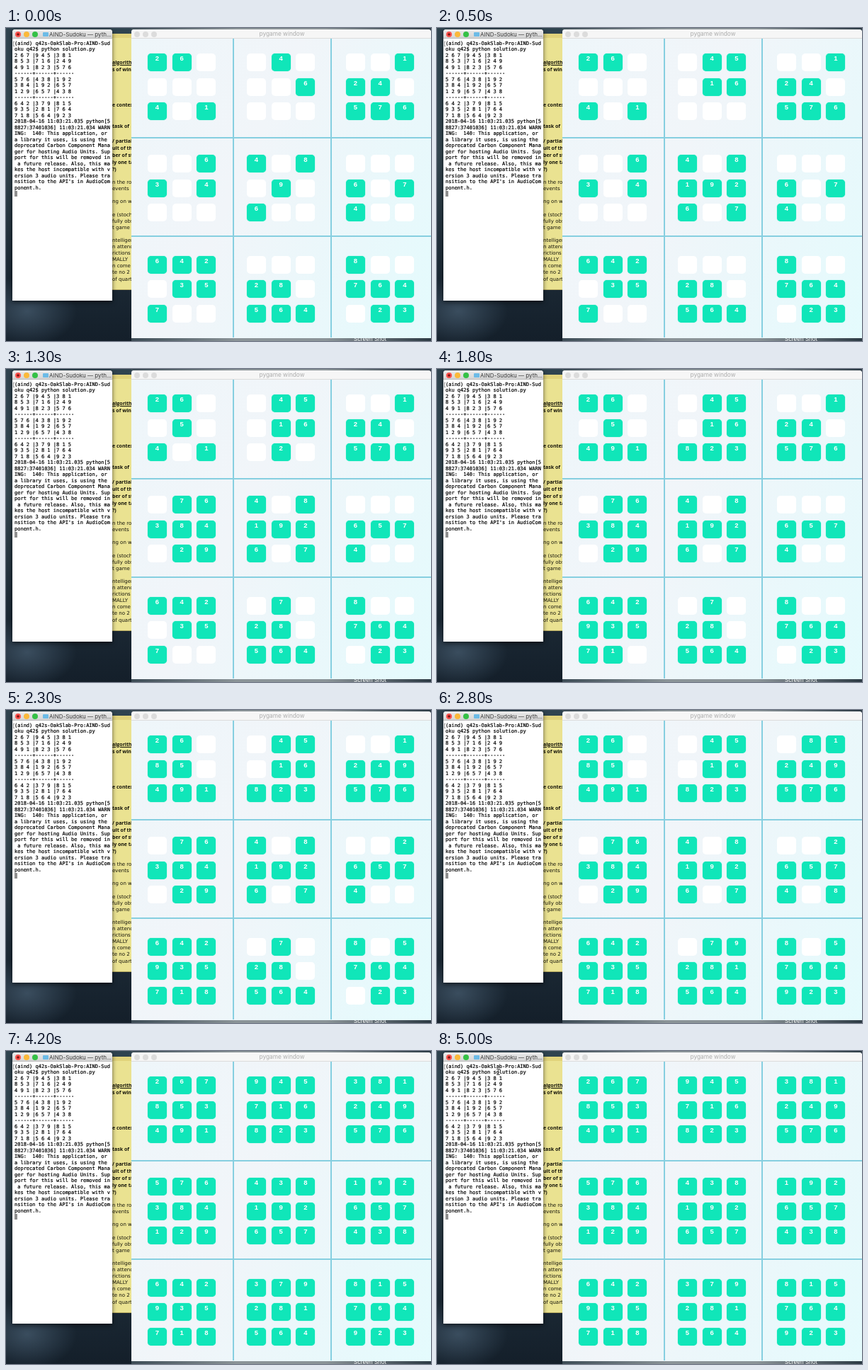
An HTML page for the animation above (5100 ms loop, 600 by 442 pixels).

```html
<!DOCTYPE html>
<html lang="en">
<meta charset="utf-8">
<title>Sudoku solver</title>
<style>
html, body { margin: 0; width: 100%; height: 100%; overflow: hidden; }
#stage {
  position: relative; width: 600px; height: 442px; overflow: hidden;
  background:
    linear-gradient(90deg, #3d4c56, #8b9498 35%, #8b9498 65%, #2c3a44) 177px 0 / 423px 100% no-repeat,
    radial-gradient(ellipse at 30px 400px, #3a4d5e, #1a283500 70px),
    linear-gradient(#2f434f, #34464f 40%, #1d2b37 75%, #141f2a);
}
#stage div, pre { position: absolute; box-sizing: border-box; margin: 0; white-space: pre; }
.win { overflow: hidden; }
.bar { left: 0; top: 0; width: 100%; height: 13px; }
.bar i { position: absolute; top: 3px; width: 8px; height: 8px; border-radius: 50%; }
.bar span { position: absolute; top: 1px; line-height: 13px; font-family: Inter, sans-serif; }

#shot { left: 491px; top: 433.5px; font: 8px/10px Inter, sans-serif; color: #fff; }

#notes { left: 100px; top: 8px; width: 90px; height: 362px; background: #eae291; border-top: 6px solid #e0d27a; border-bottom: 1px solid #b8ab62; }
#notes pre { left: 50px; top: 29.5px; font: 7px/9.1px "DejaVu Sans", sans-serif; color: #15140a; }
#notes b { font-family: "Open Sans", sans-serif; }

#term { left: 9px; top: 2px; width: 141px; height: 383px; background: #fff; border-radius: 4px 4px 0 0; box-shadow: 0 2px 6px #0009; }
#term .bar { background: linear-gradient(#ececec, #d4d4d4); border-bottom: 1px solid #b9b9b9; }
#term .bar span { left: 52px; font-size: 8px; color: #3c3c3c; }
#term .bar i:first-child { background: radial-gradient(#7a1512 1.3px, #f9504b 2px); }
#folder { left: 43px; top: 4px; width: 8px; height: 6px; border-radius: 1px; background: #6dbbe6; }
#term pre { left: 3px; top: 15.9px; font: 7px/8.5px "DejaVu Sans Mono", monospace; color: #000; -webkit-text-stroke: .2px #000; }
#mark { left: 1px; top: 17px; width: 2px; height: 7px; border: solid #999; border-width: .7px 0 .7px .7px; }
#block { left: 3px; top: 228px; width: 4px; height: 8px; background: #8f8f8f; }

#game { left: 177px; top: 2px; width: 423px; height: 436px; border-radius: 4px 4px 0 0; background: linear-gradient(115deg, #eef6fa, #f1f5f9 40%, #e9f8fb 75%, #e4fbfd); }
#game .bar { background: #f6f6f6; border-bottom: 1px solid #dcdcdc; }
#game .bar i { background: #dcdcdc; }
#game .bar span { left: 1px; top: 0; width: 100%; text-align: center; font-size: 8.3px; color: #adadad; }
.line { background: #86cfe0; }
.tile {
  width: 27px; height: 25px; border-radius: 5px; background: #fff;
  font: bold 9.5px/14px "Liberation Sans", Arial, sans-serif; text-align: center; color: #fff;
}
.tile.on { background: #10e6b9; box-shadow: 0 0 1px #10e6b9; }

#beam { left: 84px; top: 25px; width: 5px; height: 9px; border: solid #555; border-width: 1px 0; background: linear-gradient(#555, #555) 2px 0 / 1px 100% no-repeat; }
</style>

<div id="stage">
  <div id="shot">Screen Shot</div>
  <div id="notes" class="win"><pre><b><u>algorithm</u>
s of winning




e context


task of

/ partial
ult of the
ber of steps
ly one task
?)</b>

n the room
events

ng on what

e (stochastic
fully observ
t game and

ntelligent
n attend
rictions
MALLY
n come
te no 2
of quarter</pre></div>
  <div id="term" class="win">
    <div class="bar"><i style="left:4px"></i><i style="left:16px;background:#fbb93a"></i><i style="left:28px;background:#35c146"></i><div id="folder"></div><span>AIND-Sudoku — pyth…</span></div>
    <div id="mark"></div>
    <pre id="log">(aind) q42s-OakSlab-Pro:AIND-Sud
oku q42$ python solution.py
2 6 7 |9 4 5 |3 8 1
8 5 3 |7 1 6 |2 4 9
4 9 1 |8 2 3 |5 7 6
------+------+------
5 7 6 |4 3 8 |1 9 2
3 8 4 |1 9 2 |6 5 7
1 2 9 |6 5 7 |4 3 8
------+------+------
6 4 2 |3 7 9 |8 1 5
9 3 5 |2 8 1 |7 6 4
7 1 8 |5 6 4 |9 2 3
2018-04-16 11:03:21.035 python[5
8827:37401036] 11:03:21.034 WARN
ING:  140: This application, or
a library it uses, is using the
deprecated Carbon Component Mana
ger for hosting Audio Units. Sup
port for this will be removed in
 a future release. Also, this ma
kes the host incompatible with v
ersion 3 audio units. Please tra
nsition to the API's in AudioCom
ponent.h.</pre>
    <div id="block"></div>
  </div>
  <div id="game" class="win">
    <div class="bar"><i style="left:4px"></i><i style="left:16px"></i><i style="left:28px"></i><span>pygame window</span></div>
  </div>
  <div id="beam"></div>
</div>

<script>
const STEP = 100, LOOP = 5100;
// Row and column of each solved cell, in solving order; the rest are given.
const order = ("43 14 05 45 55 11 41 47 24 31 51 52 64 21 25 23 81 70 82 10 18 38 68 " +
  "75 65 86 07 58 63 13 03 02 06 67 36 37 12 57 34 30 50 54").split(" ");
const game = document.getElementById("game");
const beam = document.getElementById("beam");
const solution = document.getElementById("log").textContent
  .split("\n").slice(2, 13).join("").replace(/\D/g, "");

function add(className, style) {
  const el = document.createElement("div");
  el.className = className;
  for (const key in style) el.style[key] = style[key] + "px";
  return game.appendChild(el);
}

for (const k of [0, 1]) {
  add("line", { left: 143 + 138 * k, top: 13, width: 2, height: 422 });
  add("line", { left: 0, top: 152 + 139 * k, width: 423, height: 2 });
}

const place = (i, start, box, cell) => start + Math.floor(i / 3) * box + (i % 3) * cell;

const tiles = [...solution].map((digit, n) => {
  const row = Math.floor(n / 9), col = n % 9;
  const el = add("tile", { left: place(col, 23, 140, 34.7), top: place(row, 34.4, 142.6, 34.5) });
  return { el, digit, shownAt: order.indexOf(`${row}${col}`) + 1 };
});

function draw(now) {
  const t = now % LOOP, step = Math.floor(t / STEP);
  for (const { el, digit, shownAt } of tiles) {
    const on = step >= shownAt;
    if (el.classList.contains("on") !== on) {
      el.classList.toggle("on", on);
      el.textContent = on ? digit : "";
    }
  }
  beam.style.visibility = t >= 4900 ? "visible" : "hidden";
  requestAnimationFrame(() => draw(performance.now()));
}
draw(performance.now());
</script>
</html>
```
